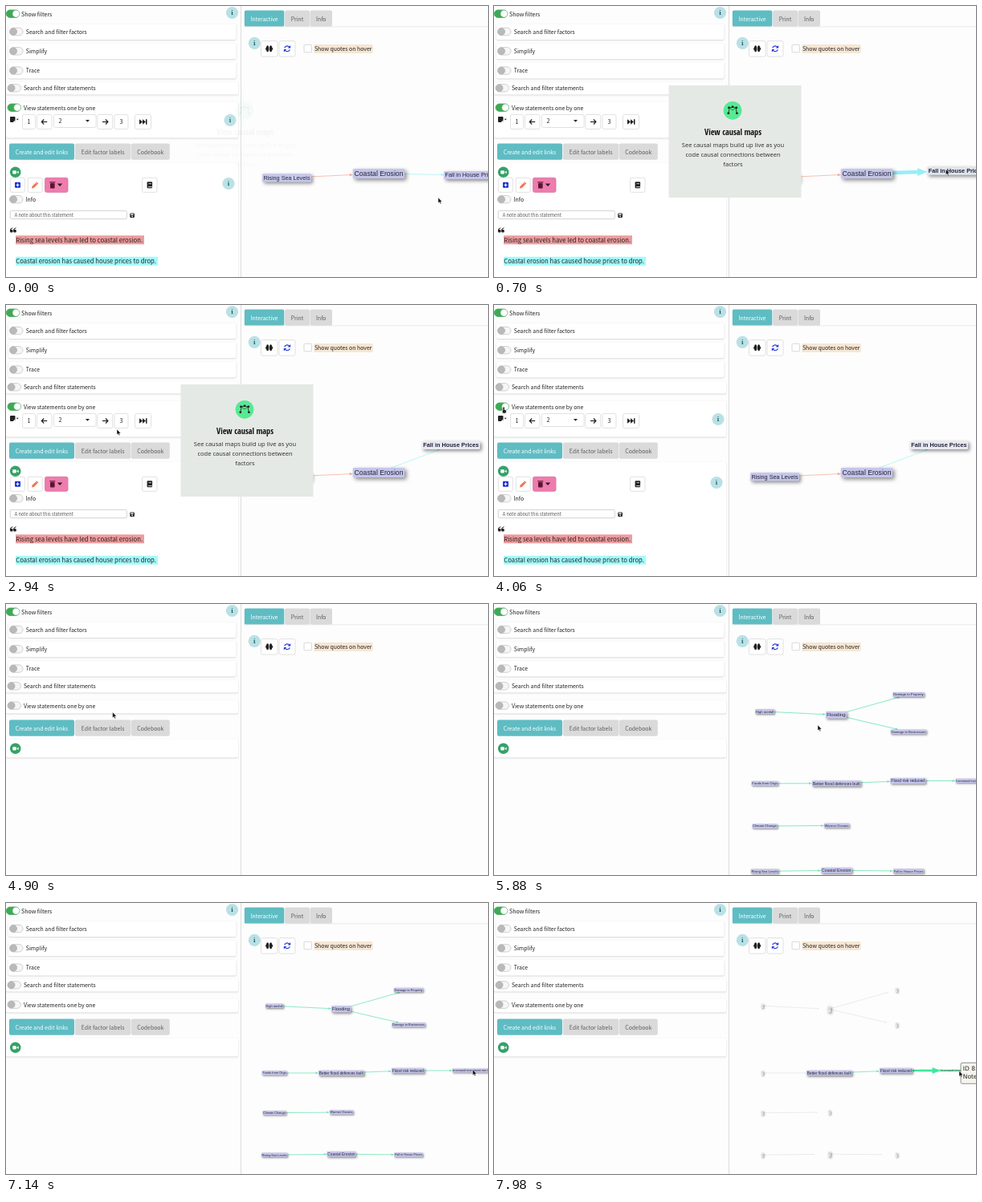
These frames come from a looping animation (600 px wide and 338 px high, 8 s). An HTML page with a canvas:

```html
<!DOCTYPE html>
<html lang="en">
<head>
<meta charset="utf-8">
<title>Causal map editor</title>
<style>
html, body { margin: 0; width: 100%; height: 100%; overflow: hidden; background: #fdfdfd; }
canvas { display: block; width: 600px; height: 338px; }
</style>
</head>
<body>
<canvas id="stage"></canvas>
<script>
const W = 600, H = 338, LOOP = 8000;
const canvas = document.getElementById('stage');
const ctx = canvas.getContext('2d');
const dpr = window.devicePixelRatio || 1;
canvas.width = W * dpr;
canvas.height = H * dpr;

const UI = '"Noto Sans CJK JP", "Noto Sans CJK SC", "Noto Sans CJK KR", "Noto Sans CJK", Lato, sans-serif';
const MAP = '"Liberation Sans", Arial, sans-serif';
const TIP = '"DejaVu Sans", sans-serif';
const BODY = 6.9;
const TEAL = '#5fbcc3', INK = '#222', LILAC = '#c5c5ea', GREEN = '#72e6b5';

// Timeline, ms
const T = { grab: 490, drop: 1330, unhover: 1820, toggle: 4340, collapse: 4900, map: 5740, focus: 7560, tip: 7900 };

const clamp = v => Math.max(0, Math.min(1, v));
const ease = v => v * v * (3 - 2 * v);
const ramp = (t, a, b) => ease(clamp((t - a) / (b - a)));

function along(keys, t) {
  let i = 0;
  while (i < keys.length - 2 && t >= keys[i + 1][0]) i++;
  const [a, x0, y0] = keys[i], [b, x1, y1] = keys[i + 1];
  const k = ramp(t, a, b);
  return [x0 + (x1 - x0) * k, y0 + (y1 - y0) * k];
}

function text(s, x, y, size = BODY, color = INK, font = UI, align = 'left', style = '') {
  ctx.font = `${style} ${size}px ${font}`;
  ctx.textAlign = align;
  ctx.fillStyle = color;
  ctx.fillText(s, x, y);
}

function box(x, y, w, h, r, fill, stroke) {
  ctx.beginPath();
  ctx.roundRect(x, y, w, h, r);
  if (fill) { ctx.fillStyle = fill; ctx.fill(); }
  if (stroke) { ctx.strokeStyle = stroke; ctx.lineWidth = 0.8; ctx.stroke(); }
}

function disc(x, y, r, fill) {
  ctx.beginPath();
  ctx.arc(x, y, r, 0, 7);
  ctx.fillStyle = fill;
  ctx.fill();
}

function poly(pts, fill) {
  ctx.beginPath();
  for (let i = 0; i < pts.length; i += 2) ctx.lineTo(pts[i], pts[i + 1]);
  ctx.closePath();
  ctx.fillStyle = fill;
  ctx.fill();
}

function line(pts, color, width) {
  ctx.beginPath();
  for (let i = 0; i < pts.length; i += 2) ctx.lineTo(pts[i], pts[i + 1]);
  ctx.strokeStyle = color;
  ctx.lineWidth = width;
  ctx.stroke();
}

function panel(x, y, w, h) {
  ctx.save();
  ctx.shadowColor = 'rgba(0,0,0,.18)';
  ctx.shadowBlur = 2 * dpr;
  ctx.shadowOffsetY = 0.7 * dpr;
  box(x, y, w, h, 2, '#fff');
  ctx.restore();
}

function toggle(x, y, on) {
  box(x, y, 16.5, 9.4, 4.7, on ? '#3fa956' : '#f6f6f6', on ? '#3fa956' : '#c4c4c4');
  disc(on ? x + 12.2 : x + 4.7, y + 4.7, 4.4, on ? '#fff' : '#b9b9b9');
  ctx.strokeStyle = on ? '#8fb89a' : '#a9a9a9';
  ctx.lineWidth = 0.6;
  ctx.stroke();
}

function info(x, y) {
  disc(x, y, 7.6, '#b9e1e5');
  text('i', x, y + 2.6, 7, '#16555c', '"Noto Serif", serif', 'center', 'bold');
}

function button(x, y, w, h, fill = '#fff', stroke = '#dadada') {
  box(x, y, w, h, 2, fill, stroke);
}

function caret(x, y, s = 2.5) {
  poly([x - s, y - s / 2, x + s, y - s / 2, x, y + s / 2 + 0.3], INK);
}

function tab(label, x, y, w, active) {
  box(x, y - 0.5, w, 20.2, 2, active ? TEAL : '#dadada');
  text(label, x + w / 2, y + 12.6, BODY, active ? '#fff' : '#5c5c5c', UI, 'center', active ? '500' : '');
}

function arrowIcon(x, y, dir) {
  line([x - 3.5 * dir, y, x + 3 * dir, y], INK, 1.2);
  line([x + 0.5 * dir, y - 3, x + 3.4 * dir, y, x + 0.5 * dir, y + 3], INK, 1.2);
}

function statementNav() {
  box(5, 138, 6.5, 7, 1, INK);
  poly([11.5, 145, 8.8, 145, 11.5, 142.3], '#fff');
  caret(14.3, 141.5, 1.5);
  button(20.5, 135.5, 16, 18);
  text('1', 28.5, 147.3, 7.2, INK, UI, 'center');
  button(38.5, 135.5, 18.5, 18);
  arrowIcon(47.7, 144.5, -1);
  button(59.5, 135.5, 52.5, 16);
  text('2', 65.5, 146.3, 7.2);
  caret(101.5, 143.3);
  button(113.8, 135.5, 19, 18);
  arrowIcon(123.5, 144.5, 1);
  button(135, 135.5, 17, 18);
  text('3', 143.5, 147.3, 7.2, INK, UI, 'center');
  button(160.5, 135.5, 20, 18);
  for (const x of [166, 170]) poly([x, 141.2, x + 4, 144.5, x, 147.8], INK);
  box(174, 141.2, 1.5, 6.6, 0, INK);
  info(279, 142.5);
}

function statementEditor() {
  button(5.3, 214.3, 18, 18);
  box(11, 219.8, 7, 7, 1, '#1c35cf');
  line([12.5, 223.3, 16.5, 223.3], '#fff', 1.1);
  line([14.5, 221.3, 14.5, 225.3], '#fff', 1.1);

  button(27.2, 214.3, 18, 18);
  poly([32, 227.5, 32.6, 224.8, 37, 220.4, 39.1, 222.5, 34.7, 226.9], '#f0764f');
  line([37.8, 219.8, 39.8, 221.8], '#e05a3a', 1.2);

  button(48.5, 214.3, 28.5, 18, '#ee7cae', '#d9739f');
  box(55, 221, 5.6, 6.6, 1, '#5b1530');
  box(54.2, 219.2, 7.2, 1.2, 0.4, '#5b1530');
  caret(67, 223, 3.2);

  button(169.5, 214.3, 18.5, 18);
  box(175.6, 219.3, 6.5, 8, 1, INK);
  line([177.5, 221.6, 181, 221.6], '#fff', 0.7);
  line([177, 225.6, 182, 225.6], '#fff', 0.8);
  info(277, 221.5);

  toggle(4.5, 236.5, false);
  text('Info', 24.5, 243.8);
  box(5.3, 255.4, 145, 10.2, 1.5, '#fff', '#c8c8c8');
  text('A note about this statement', 10.8, 262.6, 5.7, '#555');
  box(154.3, 258.5, 5.6, 5.6, 1, INK);
  box(155.3, 259.3, 3.2, 1.4, 0, '#fff');
  disc(157.1, 262.3, 0.9, '#fff');

  for (const x of [6.8, 11]) {
    disc(x, 280.7, 1.9, INK);
    line([x - 1.4, 280.6, x - 1, 278, x + 1.5, 276.7], INK, 1);
  }
  box(12, 286.3, 160, 11, 0, '#ee9c9e');
  text('Rising sea levels have led to coastal erosion.', 12.3, 294.8, 7.76);
  box(12, 312.8, 177, 11, 0, '#a2fbfc');
  text('Coastal erosion has caused house prices to drop.', 12.3, 321.2, 7.76);
}

function filters(t) {
  const open = t < T.collapse;
  toggle(0.3, 5, true);
  text('Show filters', 19, 12.8, 7);
  info(281.5, 8.5);
  ['Search and filter factors', 'Simplify', 'Trace'].forEach((label, i) => {
    const y = 22.5 + i * 24.3;
    panel(3, y, 283.5, 19.5);
    toggle(4.5, y + 4.8, false);
    text(label, 24.8, y + 12.3);
  });
  panel(0, 95, 289, 15.5);
  toggle(2, 97.6, false);
  text('Search and filter statements', 22, 105.3);
  panel(0, 119.5, 289, open ? 45 : 17);
  toggle(2, 122, t < T.toggle);
  text('View statements one by one', 22, 129.7);
  if (open) statementNav();

  const y = open ? 172 : 145;
  tab('Create and edit links', 4, y, 81, true);
  tab('Edit factor labels', 85.8, y, 69.5);
  tab('Codebook', 155.8, y, 48);
  panel(0, y + 23.5, 289, open ? 160 : 23);
  disc(11.7, y + 35.3, 6.8, '#35a267');
  box(8.2, y + 33.2, 4.6, 4.2, 0.8, '#fff');
  poly([13.2, y + 35.3, 15.6, y + 33.4, 15.6, y + 37.2], '#fff');
  if (open) statementEditor();
}

function toolbar() {
  tab('Interactive', 296.8, 6, 49.5, true);
  tab('Print', 347, 6, 31);
  tab('Info', 378.5, 6, 27.5);
  box(296, 25.5, 304, 0.7, 0, '#e2e2e2');
  info(309.3, 46.3);
  button(317.4, 43.6, 20.6, 19.5);
  for (const s of [-1, 1]) {
    ctx.beginPath();
    ctx.ellipse(327.6 + s * 2, 53.3, 1.7, 4, 0, 0, 7);
    ctx.fillStyle = INK;
    ctx.fill();
    disc(327.6 + s * 2.6, 53.3, 1.9, INK);
  }
  button(340, 43.6, 20, 19.5);
  ctx.strokeStyle = '#2639d8';
  ctx.lineWidth = 1.2;
  for (const a of [0, Math.PI]) {
    ctx.beginPath();
    ctx.arc(350, 53.3, 3.4, a + 0.3, a + 2.6);
    ctx.stroke();
  }
  poly([354.2, 49, 354.2, 52.6, 350.7, 52.6], '#2639d8');
  poly([345.8, 57.6, 345.8, 54, 349.3, 54], '#2639d8');
  box(371, 48.3, 9.5, 9.5, 1, '#fff', '#cfcfcf');
  box(383.5, 48, 73, 11, 0, '#f6e6d3');
  text('Show quotes on hover', 384, 55.9);
}

const node = (label, x, y, size, style = '') => ({ label, x, y, size, style });

function extent(n) {
  ctx.font = `${n.style} ${n.size}px ${MAP}`;
  return [ctx.measureText(n.label).width / 2 + n.size * 0.2, n.size * 0.7];
}

function drawNode(n, fill = LILAC, ink = '#24243a') {
  const [w, h] = extent(n);
  ctx.save();
  ctx.shadowColor = 'rgba(0,0,0,.45)';
  ctx.shadowBlur = n.size * 0.6 * dpr;
  ctx.shadowOffsetX = ctx.shadowOffsetY = n.size * 0.28 * dpr;
  box(n.x - w, n.y - h, w * 2, h * 2, n.size * 0.15, fill);
  ctx.restore();
  text(n.label, n.x, n.y + n.size * 0.34, n.size, ink, MAP, 'center', n.style);
}

// Straight link from a to the border of b
function drawEdge(a, b, color, width, head) {
  const dx = b.x - a.x, dy = b.y - a.y, len = Math.hypot(dx, dy);
  const [w, h] = extent(b);
  const cut = Math.min(w / (Math.abs(dx) || 1e-6), h / (Math.abs(dy) || 1e-6), 1);
  const x = b.x - dx * cut, y = b.y - dy * cut;
  const ux = dx / len, uy = dy / len;
  line([a.x, a.y, x - ux * head * 0.8, y - uy * head * 0.8], color, width);
  const bx = x - ux * head, by = y - uy * head, s = head * 0.4;
  poly([x, y, bx - uy * s, by + ux * s, bx + uy * s, by - ux * s], color);
}

function tooltip(x, y, lines) {
  box(x, y, 90, 26, 2, '#f5f4ed', '#777');
  lines.forEach((s, i) => text(s, x + 2.8, y + 9.6 + i * 10.3, 7.5, INK, TIP));
}

const houseKeys = [[0, 579, 211], [T.grab, 579, 211], [T.drop, 556, 177], [1600, 554, 174.8], [LOOP, 554, 174.8]];

function statementMap(t) {
  const held = t >= T.grab, hot = t >= T.grab && t < T.unhover;
  const [hx, hy] = along(houseKeys, t);
  const sea = node('Rising Sea Levels', 349.5, 214.3, 7.25);
  const coast = node('Coastal Erosion', 464, 209, 8.65);
  const house = node('Fall in House Prices', hx, hy, 7.3, held ? 'bold' : '');
  drawEdge(sea, coast, '#f4a595', 0.7, 4);
  drawEdge(coast, house, hot ? '#95eff4' : '#9bf3f0', hot ? 4.6 : 0.7, hot ? 12 : 3.5);
  drawNode(sea);
  drawNode(coast);
  drawNode(house, hot ? '#dfe5ea' : held ? '#e8e8f1' : LILAC);
  if (t >= T.drop && t < T.unhover) tooltip(568.7, 200.7, ['ID 13: Fall', 'Note:']);
}

const nodes = [
  node('High rainfall', 334, 128.3, 3.95),
  node('Flooding', 417, 132.3, 5.7),
  node('Damage to Property', 501, 108.5, 3.9),
  node('Damage to Businesses', 501, 152, 3.9),
  node('Funds from Orgs', 334, 212, 3.9),
  node('Better flood defences built', 417.3, 212, 4.75),
  node('Flood risk reduced', 500.3, 209, 4.75),
  node('Increased investment into local area', 585.5, 209, 3.65),
  node('Climate Change', 334, 261.7, 3.85),
  node('Warmer Oceans', 417.5, 261, 3.85),
  node('Rising Sea Levels', 334, 314.2, 3.85),
  node('Coastal Erosion', 417.3, 313.2, 4.8),
  node('Fall in House Prices', 501, 314, 3.85)
];
const links = [[0, 1], [1, 2], [1, 3], [4, 5], [5, 6], [6, 7], [8, 9], [10, 11], [11, 12]];

function fullMap(t) {
  const focus = t >= T.focus;
  const k = 1 + 0.0718 * (1 - ramp(t, 5950, 6650));
  ctx.save();
  ctx.translate(292.5, 47.8);
  ctx.scale(k, k);
  ctx.translate(-292.5, -47.8);
  for (const [i, j] of links) {
    const hot = focus && j === 7, dim = focus && i !== 5 && i !== 6;
    if (hot) line([530, 209, 584, 209], '#7fe9bb', 2.6);
    drawEdge(nodes[i], nodes[j], dim ? '#e0e0e0' : hot ? '#3fe79b' : GREEN, hot ? 2.6 : dim ? 0.6 : 0.8, hot ? 10 : dim ? 2 : 3.5);
  }
  nodes.forEach((n, i) => {
    if (focus && i === 7) text(n.label, n.x, n.y + 1.3, n.size, '#1e4a38', MAP, 'center');
    else if (focus && i !== 5 && i !== 6) drawNode(node('I', n.x, n.y, n.size), '#ececec', '#999');
    else drawNode(n);
  });
  ctx.restore();
  if (t >= T.tip) tooltip(581, 199.3, ['ID 8: Flood', 'Note:']);
}

function card(t) {
  const alpha = Math.min(0.04 + 0.96 * ramp(t, 20, 560), 1 - ramp(t, 3300, 3800));
  if (alpha <= 0) return;
  ctx.save();
  ctx.globalAlpha = alpha;
  box(217.5, 99, 165, 140, 0, '#e5e9e6');
  disc(297, 130.3, 11.4, '#57ea93');
  line([292, 134, 293, 127, 297, 126, 301, 127, 302.3, 134], INK, 0.8);
  line([293, 127, 297, 130, 301, 127], INK, 0.6);
  for (const [x, y] of [[292.4, 126.8], [297, 125.8], [301.8, 126.8], [291.8, 133.8], [302.4, 133.8]])
    box(x - 1.3, y - 1.3, 2.6, 2.6, 0.8, INK);
  text('View causal maps', 297.5, 160.6, 10.2, '#111', '"Open Sans Condensed", "Open Sans", "Noto Sans", sans-serif', 'center', 'bold condensed');
  ['See causal maps build up live as you', 'code causal connections between', 'factors'].forEach((s, i) =>
    text(s, 297.5, 176.3 + i * 12, 7.55, '#2b2b2b', '"Open Sans", "Noto Sans", sans-serif', 'center'));
  ctx.restore();
}

const cursorKeys = [
  [0, 538, 239], [380, 566, 209], [T.grab, 566, 209], [T.drop, 543, 175], [1600, 541, 172.8],
  [1800, 541, 174], [2750, 138, 155], [3150, 138, 155], [3900, 12, 128], [4550, 12, 128],
  [5500, 403, 151], [6250, 403, 151], [7000, 581, 208], [7400, 581, 208], [7700, 579, 209.5], [LOOP, 579, 209.5]
];

function cursor(t) {
  const [x, y] = along(cursorKeys, t);
  ctx.save();
  ctx.translate(x, y);
  ctx.lineJoin = 'round';
  if (x < 20) {
    box(-0.8, -1, 1.8, 6, 0.9, INK, '#fff');
    box(-1.8, 2.4, 5.2, 4.8, 1.6, INK, '#fff');
    box(-0.5, -0.6, 1.3, 5, 0.6, INK);
  } else {
    poly([0, 0, 0, 6.8, 1.6, 5.4, 2.7, 7.8, 3.8, 7.3, 2.8, 5, 4.8, 4.9], '#111');
    ctx.strokeStyle = '#fff';
    ctx.lineWidth = 0.4;
    ctx.stroke();
  }
  ctx.restore();
}

function draw(t) {
  ctx.setTransform(dpr, 0, 0, dpr, 0, 0);
  ctx.fillStyle = '#fdfdfd';
  ctx.fillRect(0, 0, W, H);
  filters(t);
  box(292, 0, 0.9, H, 0, '#d9d9dc');
  toolbar();
  ctx.save();
  ctx.beginPath();
  ctx.rect(290, 64, 310, 274);
  ctx.clip();
  if (t < T.collapse) statementMap(t);
  else if (t >= T.map) fullMap(t);
  ctx.restore();
  card(t);
  cursor(t);
}

const start = performance.now();
function tick() {
  draw((performance.now() - start) % LOOP);
  requestAnimationFrame(tick);
}
tick();
</script>
</body>
</html>
```
